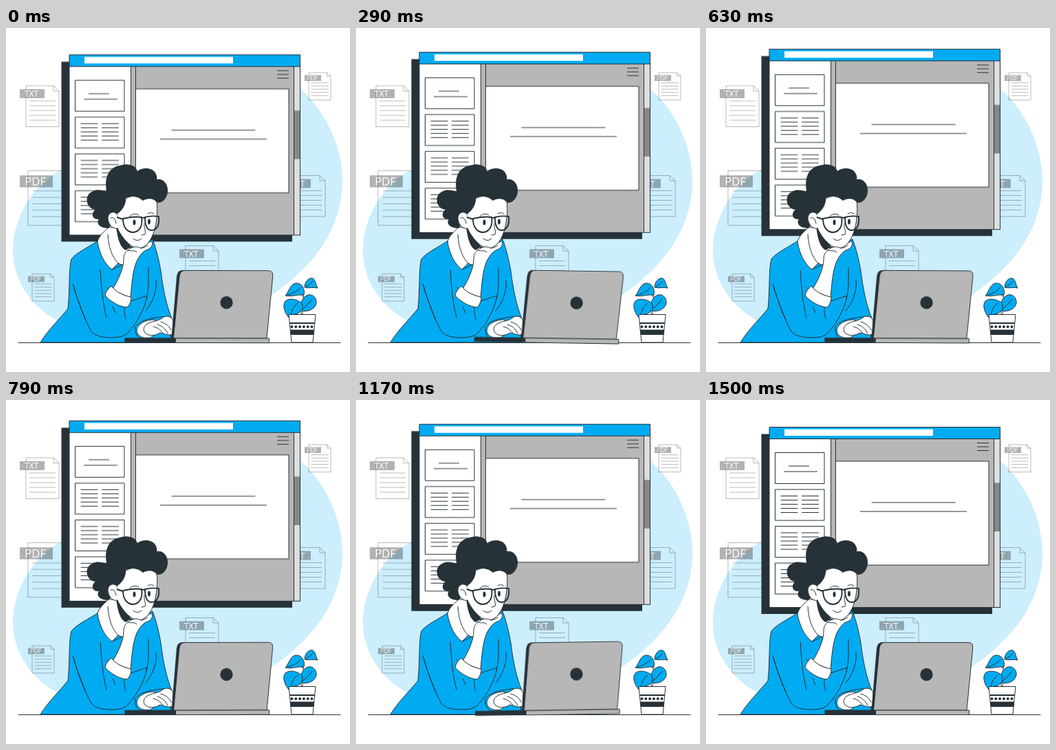
An HTML page that plays this animation: 500 by 500 pixels, repeating every 1.54 s.

```html
<!DOCTYPE html>
<html lang="en">
<head>
<meta charset="utf-8">
<title>Working on slides</title>
<style>
  :root { --blue: #01abf2; --ink: #263238; --grey: #b7b7b7; }
  html, body { margin: 0; width: 100%; height: 100%; overflow: hidden; background: #fff; }
  svg { display: block; width: 100%; height: 100%; }
  .line { fill: none; stroke: var(--ink); stroke-width: 1; stroke-linecap: round; stroke-linejoin: round; }
  .white, .blue, .grey { stroke: var(--ink); stroke-width: 1; stroke-linejoin: round; }
  .white { fill: #fff; }
  .blue { fill: var(--blue); }
  .grey { fill: var(--grey); }
  .ink { fill: var(--ink); }
  .doc path { fill: none; stroke: #000; stroke-opacity: .3; stroke-width: .9; vector-effect: non-scaling-stroke; }
  .doc rect { fill: #000; fill-opacity: .3; }
  .doc text {
    fill: #fff; font: 12.5px "Open Sans", "Noto Sans", sans-serif;
    font-stretch: 75%; text-anchor: middle;
  }
  #window { animation: float 1540ms linear -40ms infinite; }
  #laptop { transform-origin: 280px 405px; animation: sway 1540ms linear -40ms infinite; }
  @keyframes float {
    0%, 100% { transform: translateY(0); }
    50% { transform: translateY(-10px); }
  }
  @keyframes sway {
    0%, 100% { transform: rotate(0deg); }
    25% { transform: rotate(1deg); }
    75% { transform: rotate(-1deg); }
  }
</style>
</head>
<body>
<svg viewBox="0 0 500 500">
  <path fill="#cceefd" d="M10 323C10 277 39 226 81 206C150 172 210 60 330 60C370 60 402 68 428 89C464 120 489 172 489 222C489 300 436 354 388 387C340 420 290 432 240 434C180 438 110 446 76 426C36 405 10 366 10 323Z"/>
  <g id="docs"></g>

  <g id="window">
    <rect class="ink" x="80.5" y="49.5" width="335.5" height="261.5"/>
    <rect class="white" x="92" y="56.5" width="335.5" height="245"/>
    <rect class="grey" x="181.5" y="56.5" width="237" height="245"/>
    <rect x="418.5" y="56.5" width="9" height="245" fill="#dedede" stroke="#263238"/>
    <rect x="419" y="120.5" width="8" height="70.5" fill="#878787"/>
    <path class="line" d="M188.5 57V301"/>
    <rect class="blue" x="92" y="39.5" width="335.5" height="17"/>
    <rect x="114" y="42.5" width="216" height="9.5" fill="#fff"/>
    <path class="line" d="M394.5 62.5h16M394.5 68h16M394.5 73.5h16"/>
    <rect class="white" x="188.5" y="89" width="222.5" height="151"/>
    <path class="line" d="M241 149h121M224.500 162h154"/>
    <g id="thumbs"></g>
  </g>

  <path class="line" d="M18 457.500H486"/>

  <g id="plant">
    <path class="line" d="M431 377C434 392 431 402 431 417M431 390C428 382 422 385 417 388M432 400L441 393M430 417C428 409 422 404 417 402"/>
    <path class="blue" d="M434 377C434 369 440 362 446 364C450 366 450 373 453 378C447 376 440 379 434 377Z"/>
    <path class="blue" d="M406 389C411 384 413 372 421 371C430 370 435 379 433 388C425 387 415 391 406 389Z"/>
    <path class="blue" d="M429 411C427 401 430 391 439 388C447 386 452 394 451 400C449 409 439 413 429 411Z"/>
    <path class="blue" d="M414 424C405 416 401 403 406 397C411 392 424 394 430 400C434 408 427 416 419 416C415 418 415 421 414 424Z"/>
    <path class="line" stroke-width=".7" d="M436 376Q442 373 446 368M409 388Q422 385 428 377M431 409Q440 401 445 394M414 418Q415 406 424 400"/>
    <path class="white" d="M411 416.500H450L446 457H415Z"/>
    <path class="ink" d="M412 428H449L448.700 430H412.300ZM413 438.500H448L447.200 446H413.800Z"/>
    <path d="M415.500 434.200H448" stroke="#263238" stroke-width="4" stroke-linecap="round" stroke-dasharray="0 5.800"/>
  </g>

  <g id="person">
    <path class="blue" d="M134 309C121 318 101 327 95 336C91 350 93 380 90 408C77 424 61 439 50 457H241V422C234 405 229 385 225 353C222 336 218 320 213 307L190 318L160 320Z"/>
    <path class="white" d="M149 290C141 297 134 304 133 311C136 328 143 343 154 351L163 342L175 347L182 322L163 290Z"/>
    <path class="ink" d="M160 287L182 318L174 323C166 319 162 307 160 287Z"/>
    <path class="line" d="M163 342C154 333 149 318 148 300M154 351L169 344"/>

    <path class="white" d="M160 268C166 262 170 253 174 248C190 239 210 245 219 251C221 265 219 284 215 296C211 308 205 317 196 320C184 322 170 308 162 291Z"/>
    <path class="ink" d="M148 291C138 291 130 285 135 278C125 279 123 269 130 264C116 263 113 243 125 238C133 233 140 237 146 237C143 219 148 203 165 200C177 196 188 199 191 208C198 202 211 203 216 209C219 213 220 217 219 220C231 218 238 231 234 243C231 251 226 254 220 254C214 247 206 247 199 251C193 245 183 243 174 247C175 255 170 265 162 270L160 282Z"/>
    <path class="white" d="M161 270C155 265 148 269 148 277C149 286 155 293 163 291"/>
    <path class="line" d="M152 276C156 274 159 278 160 284"/>
    <path class="line" stroke-width="1" d="M180 274C183 270 189 269 193 272M206 270C209 268 212 268 215 270M201 284C200 290 204 296 202 300L197 301M185 306C189 310 194 309 197 306"/>
    <ellipse class="ink" cx="186.500" cy="282.500" rx="2" ry="4"/>
    <ellipse class="ink" cx="208" cy="281.500" rx="2" ry="4"/>
    <g fill="none" stroke="#263238" stroke-width="1.900" stroke-linejoin="round">
      <path d="M170 277C178 275 190 274 197 275C199 286 195 296 185 297C175 297 170 288 170 277ZM202 275C209 273 216 273 222 274C223 285 220 293 212 294C204 294 202 285 202 275ZM197 277Q200 274 202 277M161 275L170 278"/>
    </g>

    <path class="white" d="M177 323C184 317 190 317 196 320C203 318 207 310 212 310C214 315 211 320 206 322C199 324 194 331 190 339C184 353 183 371 181 392L154 381C163 367 171 349 171 337C171 330 173 326 177 323Z"/>
    <path class="line" d="M177 323C182 325 187 322 190 326M196 320C200 320 203 318 206 316"/>

    <path class="blue" d="M98 374C105 400 115 425 124 441C130 448 141 450 152 450C166 450 173 448 178 442C191 428 202 407 205 389L181 397L152 383L140 371"/>
    <path d="M99 373L141 370L151 384L148 390L105 396Z" fill="#01abf2"/>
    <path class="white" d="M153 375C147 380 143 387 145 390C154 399 165 405 176 406C180 402 182 397 182 391C171 389 160 384 153 375Z"/>
    <path class="line" d="M207 348C207 366 208 379 204 394M137 352C139 378 140 397 146 421M97 372C102 390 109 408 116 424M172 407C171 413 173 419 174 423M218 367C220 381 213 400 203 411M155 405L159 414"/>

    <path class="blue" d="M188 434C196 424 211 421 237 419L240 452H196C189 449 187 441 188 434Z"/>
    <path class="white" d="M216 424C202 424 191 430 190 440C191 448 199 452 210 450L221 443Z"/>
    <path class="white" d="M204 431C212 425 222 427 229 420C236 417 242 421 243 426L242 445C236 448 230 444 224 443C216 448 207 448 202 443C199 439 200 434 204 431Z"/>
    <path class="line" d="M225 427C232 429 237 433 240 439M220 431C228 433 232 438 235 444M214 434C220 435 224 439 228 443"/>
  </g>

  <g id="laptop">
    <rect class="ink" x="172.500" y="450.500" width="75" height="7"/>
    <path class="ink" d="M240.500 451L248 361Q249 352 257 352H264L250 451Z"/>
    <path class="grey" d="M243.500 451L252 361Q253 352.500 260 352.500H381Q388.500 352.500 387.700 360.500L379 451Z"/>
    <rect class="grey" x="246.500" y="451" width="136" height="6.500"/>
    <circle class="ink" cx="320.500" cy="399" r="9.200"/>
  </g>
</svg>
<script>
  const fill = (id, items, draw) =>
    document.getElementById(id).innerHTML = items.map(draw).join('');

  // Text rows as horizontal strokes
  const rows = (x, y, w, step) =>
    Array.from({ length: 5 }, (_, i) => `M${x} ${y + i * step}h${w}`).join('');

  const docs = [
    ['TXT', 29, 84, 1], ['PDF', 32, 207.5, 4 / 3], ['PDF', 440, 65, 2 / 3],
    ['TXT', 416, 214.5, 1], ['TXT', 261, 316.5, 1], ['PDF', 38, 357.3, 2 / 3]
  ];
  fill('docs', docs, ([type, x, y, k]) => `
    <g class="doc" transform="translate(${x} ${y}) scale(${k})">
      <path d="M0 0H40L48 7.5V59.5H0ZM40 0V7.5H48${rows(5, 22, 38, 7)}"/>
      <rect x="-9" y="5" width="36" height="13"/>
      <text x="8" y="16.2">${type}</text>
    </g>`);

  fill('thumbs', [0, 1, 2, 3], i => {
    const y = 76.5 + i * 53.5;
    const text = i
      ? rows(109, y + 9.5, 24, 6) + rows(139.5, y + 9.5, 24, 6)
      : `M120.5 ${y + 19.5}h29M113.5 ${y + 27.5}h48`;
    return `<rect class="white" x="100.5" y="${y}" width="71.5" height="45"/>
      <path class="line" d="${text}"/>`;
  });
</script>
</body>
</html>
```
